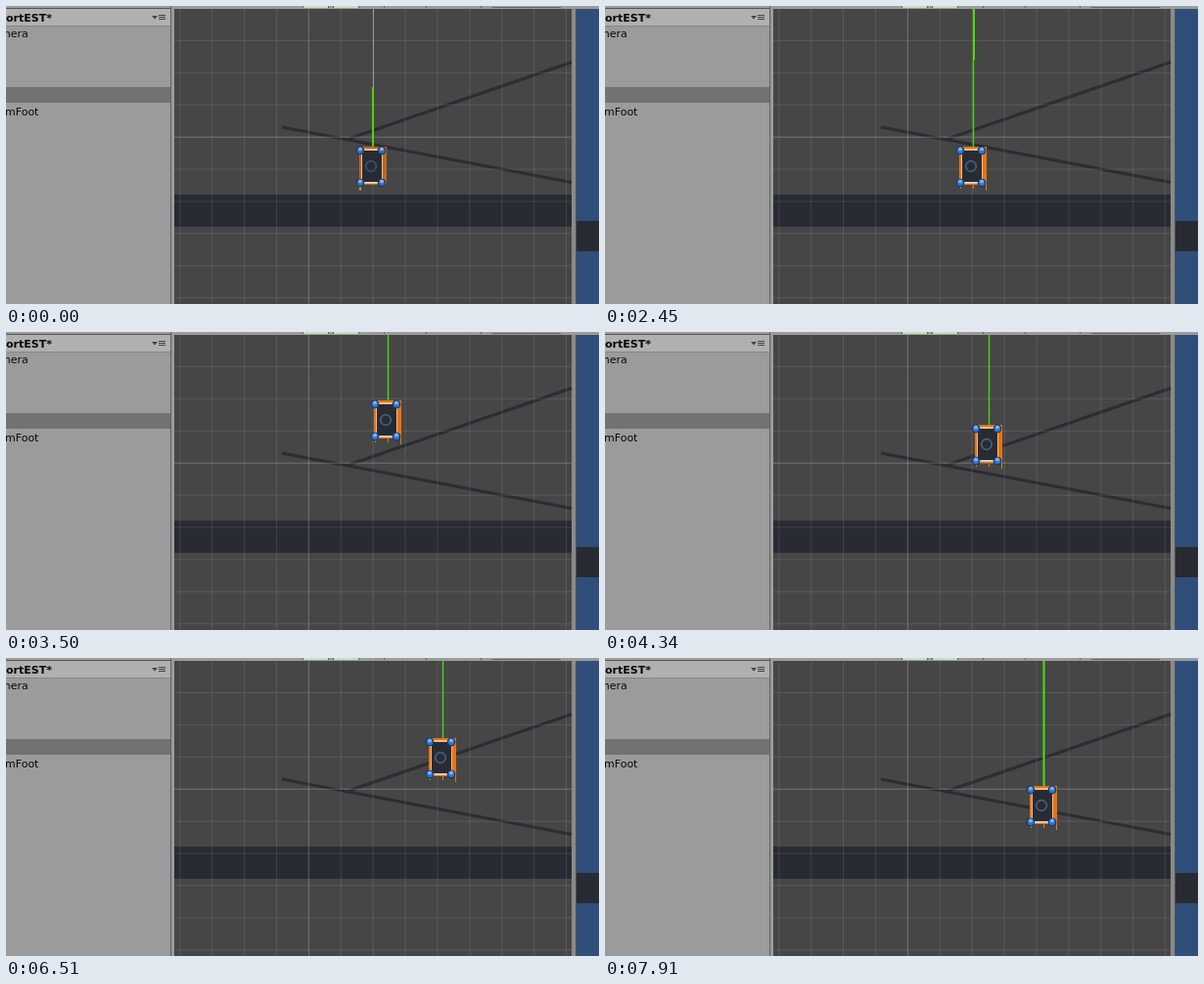
An HTML page with a canvas for the animation above (8000 ms loop, 606 by 305 pixels).

```html
<!DOCTYPE html>
<html lang="en">
<head>
<meta charset="utf-8">
<title>Scene editor</title>
<style>
  html, body { margin: 0; width: 100%; height: 100%; overflow: hidden; background: #9b9b9b; }
  canvas { display: block; }
</style>
</head>
<body>
<canvas id="stage" width="606" height="305"></canvas>
<script>
const ctx = document.getElementById('stage').getContext('2d');
const LOOP = 8000, STEP = 70;
const DARK = '#292b33';
const VIEW = { x: 172, y: 3, w: 406, h: 302 };

// Ramp gradients; also the sideways lean of the normal ray per pixel of height.
const UPPER = -0.345, LOWER = 0.19;
const upperY = x => 96.5 + UPPER * (x - 404);
const lowerY = x => 134.5 + LOWER * (x - 446);
const air = (t, x, y) => ({ t, x, y, lean: 0 });
const upper = (t, x) => ({ t, x, y: upperY(x), lean: UPPER });
const lower = (t, x) => ({ t, x, y: lowerY(x), lean: LOWER });

const poses = [
  air(0, 373, 164.5), air(2240, 373, 164.5), air(2520, 374.5, 164.5),
  air(2590, 374.5, 164.5), air(2870, 380, 164.5), air(3010, 384, 164.5),
  air(3430, 387.5, 100), air(3710, 389, 61), air(3920, 390, 61),
  upper(4060, 390), upper(4270, 390),
  air(4340, 390, 115.5), air(4480, 390, 115.5),
  upper(4550, 397), upper(4690, 385), upper(5040, 385),
  air(5110, 386, 117.5), air(5180, 386, 117.5),
  upper(5250, 384), upper(5390, 381), upper(5670, 381),
  upper(5740, 404), upper(5950, 443), upper(6160, 443),
  air(6230, 444, 97), air(6300, 444, 97), air(6510, 444, 102.5),
  air(6720, 444, 123), lower(6790, 444), lower(7070, 444),
  air(7140, 445, 150.5), air(7210, 445, 150.5), air(7280, 446, 154),
  lower(7420, 447), lower(7840, 447), air(7910, 446, 151.5), air(8000, 446, 151.5)
];

// Upper end of the thick ray segment while the body rests on the floor.
const rayTip = [[0, 83], [350, 77], [840, 71], [1260, 66], [1820, 62], [2170, 59], [2870, 48], [3010, 46]];
const SEGMENT = 61;

function between(keys, t, time) {
  let i = 0;
  while (i < keys.length - 2 && time(keys[i + 1]) <= t) i++;
  const a = keys[i], b = keys[i + 1];
  return [a, b, Math.min(1, (t - time(a)) / (time(b) - time(a)))];
}
const mix = (a, b, k) => a + (b - a) * k;

function poseAt(t) {
  const [a, b, k] = between(poses, t, p => p.t);
  return { x: mix(a.x, b.x, k), y: mix(a.y, b.y, k), lean: (k === 1 ? b : a).lean };
}
function tipAt(t) {
  const [a, b, k] = between(rayTip, t, p => p[0]);
  return Math.round(mix(a[1], b[1], k));
}

function box(color, x, y, w, h) {
  ctx.fillStyle = color;
  ctx.fillRect(x, y, w, h);
}
function line(color, width, x1, y1, x2, y2) {
  ctx.strokeStyle = color;
  ctx.lineWidth = width;
  ctx.beginPath();
  ctx.moveTo(x1, y1);
  ctx.lineTo(x2, y2);
  ctx.stroke();
}
function disc(x, y, r, fill, stroke, width) {
  ctx.beginPath();
  ctx.arc(x, y, r, 0, 2 * Math.PI);
  if (fill) { ctx.fillStyle = fill; ctx.fill(); }
  if (stroke) { ctx.strokeStyle = stroke; ctx.lineWidth = width; ctx.stroke(); }
}
function label(text, right, baseline, weight = '') {
  ctx.font = `${weight} 11px "DejaVu Sans", sans-serif`;
  ctx.fillStyle = '#080808';
  ctx.fillText(text, Math.round(right - ctx.measureText(text).width), baseline);
}

function drawPanels() {
  box('#9b9b9b', 0, 0, 606, 305);
  box('#555', 0, 2, 168, 1);
  box('#b0b0b0', 0, 3, 168, 17);
  box('#868686', 0, 20, 168, 1);
  box('#727272', 0, 83, 168, 16);
  box('#606060', 168, 0, 1, 305);
  label('ortEST*', 47, 16, 'bold');
  label('mera', 23, 32);
  label('mFoot', 33, 112);
  ctx.fillStyle = '#444';
  ctx.beginPath();
  ctx.moveTo(149, 10);
  ctx.lineTo(155, 10);
  ctx.lineTo(152, 13.5);
  ctx.fill();
  for (const y of [9, 11, 13]) box('#444', 156, y, 7, 1);

  for (const x of [304, 335]) box('#c3dfbd', x, 0, 25, 2);
  for (const x of [303, 329, 334, 360, 386, 429, 485]) box('#626262', x, 0, 1, 2);
  box('#666', 497, 1, 70, 1);
  box('#8a8a8a', 578, 3, 4, 302);
  box('#555', 582, 3, 1, 302);
  box('#2f4e79', 583, 3, 23, 302);
  box(DARK, 583, 220, 23, 31);
}

function drawScene() {
  box('#464646', VIEW.x, VIEW.y, VIEW.w, VIEW.h);
  box(DARK, 172, 193, 406, 33);
  line('#2b2c34', 3, 282, 124, 578, 180.5);
  line('#2b2c34', 3, 350, 136, 578, 57.5);
  const cell = 32.9;
  const tint = i => `rgba(255,255,255,${i ? .09 : .2})`;
  for (let i = -4; i <= 8; i++) box(tint(i), 308.8 + i * cell, 3, 1.2, 302);
  for (let i = -3; i <= 5; i++) box(tint(i), 172, 133.6 + i * cell, 406, 1.2);
}

function drawRay(t, { x, y, lean }) {
  const tip = tipAt(t), foot = x + 2;
  const column = Math.round(foot) + .5;
  if (t < 2310) {
    line('#9a9a9a', 1, 375.5, 3, 375.5, tip);
    line('#46c040', 1, 375.5, tip + SEGMENT, 375.5, 146);
    line('#58d200', 2, 375, tip, 375, tip + SEGMENT);
  } else if (t < 3010) {
    line('#4be000', 2, column + .5, 3, column + .5, tip);
    line('#48d60c', 1.4, column, tip, column, y);
  } else if (lean) {
    line('#46e010', 1.4, foot, y, foot + lean * y, 0);
  } else {
    line('#46e010', t < 7140 ? 1.3 : 2, column, 3, column, y);
  }
}

function drawBody(t, { x, y }) {
  const moving = t >= 2310;
  const orange = moving ? '#e87310' : '#b8681f';
  ctx.save();
  ctx.translate(Math.round(x), Math.round(y - .5));
  box(orange, -12, -20, 28, 39);
  box('#e8bf95', -10, -18, 22, 36);
  box(DARK, -9, -16, 20, 32);
  box('#d8d8d8', -9, 16, 20, 1);
  if (moving) {
    for (const tx of [-11, 2, 15]) box(orange, tx, 19, 1, tx > 10 ? 6 : 4);
  } else {
    box('#9aa02a', -12, 21, 2, 4);
  }
  disc(0, 0, 5.3, null, moving ? '#42627f' : '#355379', 1.7);
  for (const hx of [-11, 11]) for (const hy of [-16, 17]) {
    disc(hx, hy, 3.9, moving ? '#2874d6' : '#2f69b4', '#1c3050', 1);
    disc(hx, hy - 1.5, 1.9, moving ? '#7fb2f0' : '#8fb0da');
  }
  ctx.restore();
}

function draw(t) {
  drawPanels();
  drawScene();
  const pose = poseAt(t);
  ctx.save();
  ctx.beginPath();
  ctx.rect(VIEW.x, VIEW.y, VIEW.w, VIEW.h);
  ctx.clip();
  drawRay(t, pose);
  drawBody(t, pose);
  ctx.restore();
}

const start = performance.now();
function frame() {
  const t = (performance.now() - start) % LOOP;
  draw(Math.floor(t / STEP) * STEP);
  requestAnimationFrame(frame);
}
frame();
</script>
</body>
</html>
```
